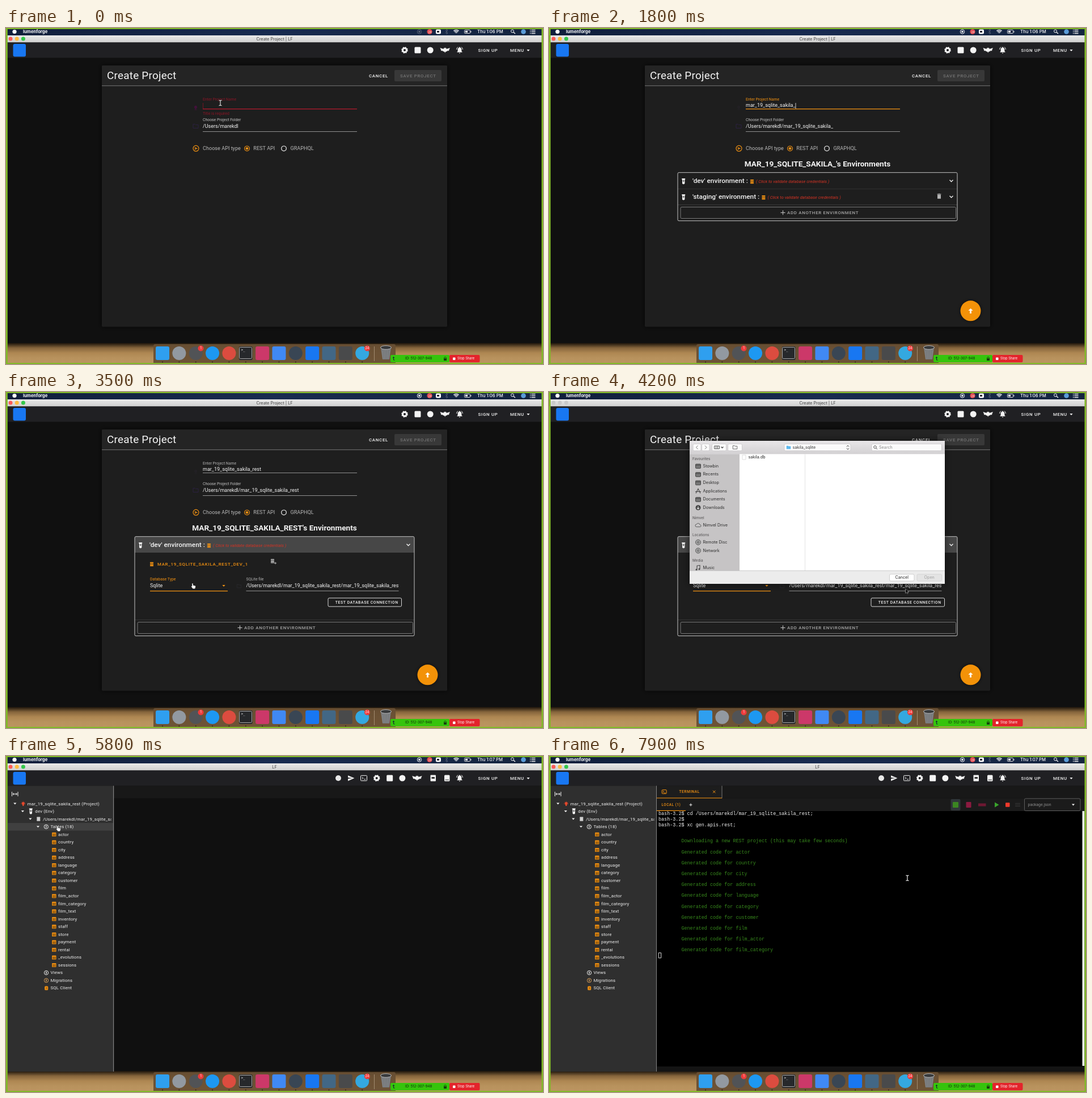
Recreate the animation shown at these times as an HTML page with a canvas. Size 947 by 592 pixels, loop 8 s.

```html
<!DOCTYPE html>
<html lang="en">
<head>
<meta charset="utf-8">
<title>Create Project</title>
<style>
html, body { margin: 0; width: 100%; height: 100%; overflow: hidden; background: #101010; }
canvas { display: block; }
</style>
</head>
<body>
<canvas id="stage" width="947" height="592"></canvas>
<script>
const c = document.getElementById('stage').getContext('2d');
const LOOP = 8000, ORANGE = '#f39212', WHITE = '#f4f4f4', GREY = '#b4b4b4';
const NAME = 'mar_19_sqlite_sakila_rest', HOME = '/Users/marekdl';
const TABLES = ('actor country city address language category customer film film_actor film_category ' +
  'film_text inventory staff store payment rental _evolutions sessions').split(' ');

// ---- drawing helpers ----
function box(x, y, w, h, fill, r = 0, stroke) {
  c.beginPath();
  c.roundRect(x, y, w, h, r);
  if (fill) { c.fillStyle = fill; c.fill(); }
  if (stroke) { c.strokeStyle = stroke; c.lineWidth = 1; c.stroke(); }
}
function dot(x, y, r, fill, stroke, lw = 1) {
  c.beginPath();
  c.arc(x, y, r, 0, 7);
  if (fill) { c.fillStyle = fill; c.fill(); }
  if (stroke) { c.strokeStyle = stroke; c.lineWidth = lw; c.stroke(); }
}
function line(color, lw, ...p) {
  c.beginPath();
  for (let i = 0; i < p.length; i += 2) c.lineTo(p[i], p[i + 1]);
  c.strokeStyle = color; c.lineWidth = lw; c.stroke();
}
function text(s, x, y, size, color = WHITE, o = {}) {
  c.font = `${o.i ? 'italic ' : ''}${o.w || 400} ${size}px ${o.f || 'Roboto'}, sans-serif`;
  c.letterSpacing = (o.ls || 0) * size + 'px';
  c.textAlign = o.a || 'left';
  c.textBaseline = 'middle';
  c.fillStyle = color;
  c.fillText(s, x, y);
  return c.measureText(s).width;
}
const caps = (s, x, y, color, size = 7.89, w = 500) => text(s, x, y, size, color, { w, ls: .0893 });
const ui = (s, x, y, size, color, o) => text(s, x, y, size, color, { f: 'Inter', ...o });
// Path on a 24-unit grid, centred on x, y
function icon(d, x, y, size, fill, stroke) {
  c.save();
  c.translate(x - size / 2, y - size / 2);
  c.scale(size / 24, size / 24);
  const p = new Path2D(d);
  if (stroke) { c.strokeStyle = stroke; c.lineWidth = 2; c.stroke(p); }
  if (fill) { c.fillStyle = fill; c.fill(p); }
  c.restore();
}
function gradient(x0, y0, x1, y1, ...colors) {
  const g = c.createLinearGradient(x0, y0, x1, y1);
  colors.forEach((k, i) => g.addColorStop(i / (colors.length - 1), k));
  return g;
}
function clip(x, y, w, h, draw) {
  c.save();
  c.beginPath(); c.rect(x, y, w, h); c.clip();
  draw();
  c.restore();
}

const SEND = 'M2 21l21-9L2 3v7l15 2-15 2z';
const BELL = 'M12 23a2 2 0 0 0 2-2h-4a2 2 0 0 0 2 2zm6-7v-5c0-3-1.6-5.6-4.5-6.3V4a1.5 1.5 0 0 0-3 0v.7C7.6 5.4 6 8 6 11v5l-2 2v1h16v-1z';
const BAT = 'M1 7L8 9Q10 9 10.5 6L12 8L13.5 6Q14 9 16 9L23 7Q21 11 20.5 14Q18 12 16 15Q13 14 12 18Q11 14 8 15Q6 12 3.5 14Q3 11 1 7z';
const BIN = 'M6 7h12v14H6zM5 4h4l1-1h4l1 1h4v2H5z';
const FOLDER = 'M3 5h7l2 2h9v12H3z';
const ARROW = 'M7 2v18l4-4 3 6 3-1.5-3-6h6z';
const HAND = 'M8 2q2-2 3 0l1 7 8 2q2 1 1 5l-2 6h-8l-6-8q0-3 3-1z';
const down = (x, y, color, r = 3) => line(color, 1.3, x - r, y - r / 2, x, y + r / 2, x + r, y - r / 2);
const tri = (x, y, color = WHITE) => icon('M3 7h18l-9 10z', x, y, 7, color);
function gear(x, y, r, color) {
  dot(x, y, r * .6, null, color, r * .5);
  c.setLineDash([r * .36, r * .3]);
  dot(x, y, r * .84, null, color, r * .32);
  c.setLineDash([]);
}
function db(x, y, color) {
  for (let i = -1; i < 2; i++) box(x - 3.2, y + i * 2.6 - 1.1, 6.4, 2, color, 1);
}
function prompt(x, y, color, w = 11) {
  box(x - w / 2, y - w * .42, w, w * .84, null, 1, color);
  line(color, 1, x - w * .3, y - 2, x - w * .1, y, x - w * .3, y + 2);
  line(color, 1, x, y + 2, x + w * .3, y + 2);
}
function flask(x, y) {
  box(x - 2.2, y - 5, 4.4, 10, WHITE, [0, 0, 2, 2]);
  box(x - 3, y - 5, 6, 1.6, WHITE);
  box(x - 1, y - 2, 2, 2.5, '#444');
}

// ---- desktop, menu bar and dock ----
function desktop(t) {
  box(0, 0, 947, 592, '#101010');
  box(0, 555, 947, 37, gradient(0, 555, 0, 590, '#1c140b', '#86653c', '#ae8752', '#b8925d', '#bb9560'));
  box(0, 0, 947, 13, gradient(0, 0, 947, 0, '#101e3b', '#182b50', '#14243f'));
  dot(15, 6.5, 3.6, '#fff');
  ui('lumenforge', 30, 6.5, 7.7, '#fff', { w: 700 });
  const rec = t < 100 ? '#5a6478' : '#fff';
  dot(729, 6.5, 3.7, null, rec); dot(729, 6.5, 1.8, rec);
  dot(747, 6.5, 4.6, '#e04a50');
  ui('24', 747.5, 8, 4.5, '#fff', { a: 'center' });
  box(758, 2.5, 9, 8, '#fff', 2); box(760, 5, 4, 3, '#223');
  line('#4a566e', 1, 775, 4, 779, 9, 777, 11, 777, 2, 779, 4, 775, 9);
  for (let r = 2; r < 8; r += 2.3) {
    c.beginPath(); c.arc(794, 10, r, -2.35, -.8);
    c.strokeStyle = '#fff'; c.lineWidth = 1.3; c.stroke();
  }
  box(808.5, 3.5, 10, 6, null, 1, '#ddd'); box(810, 5, 4, 3, '#fff'); box(819.5, 5, 1, 3, '#ddd');
  ui(t < 5000 ? 'Thu 1:06 PM' : 'Thu 1:07 PM', 831, 6.5, 7.7, '#fff', { w: 500 });
  dot(893, 5.5, 2.5, null, '#fff'); line('#fff', 1.2, 895, 7.5, 898, 10);
  dot(912.5, 6.5, 4.3, '#5a9bd8');
  for (let i = 0; i < 3; i++) { box(924, 3 + i * 3, 1.3, 1.3, '#fff'); box(926.5, 3 + i * 3, 7, 1.3, '#fff'); }
}
function dock() {
  box(260, 557, 427, 36, 'rgba(105,79,51,.94)', 3);
  const apps = [['#2f9fef', 1], ['#9299a1', 0], ['#515356', 0], ['#1d98f2', 0], ['#dc4c3f', 0], ['#26282b', 1],
    ['#cc3869', 1], ['#4089f4', 1], ['#394654', 0], ['#1877f2', 1], ['#426785', 1], ['#494a4b', 1], ['#34a8e0', 0]];
  apps.forEach(([color, square], i) => {
    const x = 276 + i * 29.35;
    if (square) box(x - 12, 561, 24, 24, color, 3);
    else dot(x, 573, 12, color);
    dot(x, 588.5, .9, '#2b1f14');
  });
  box(411.5, 562.5, 22, 20, '#26282b', 2, '#a8a8a8');
  text('>_', 414.5, 567.5, 6, '#fff', { f: 'DejaVu Sans Mono' });
  for (const [x, s] of [[343.5, '1'], [637, '24']]) {
    dot(x, 564.5, 5, '#ee3b3b');
    ui(s, x, 564.7, 5.5, '#fff', { a: 'center' });
  }
  box(649, 561, 1, 26, '#a18b70');
  icon('M3 3h18l-3 20H6z', 670, 573, 24, '#74777a');
  c.beginPath(); c.ellipse(670, 563, 9.5, 3.3, 0, 0, 7);
  c.fillStyle = '#383a3c'; c.fill(); c.strokeStyle = '#bbb'; c.lineWidth = 1; c.stroke();
  for (let i = -2; i < 3; i++) line('#999', .6, 670 + i * 3.5, 567, 670 + i * 2.6, 583);
}
function shareBar() {
  box(678, 576, 104, 13, '#35c40c', 2);
  box(782, 576, 53.5, 13, '#e3242b', 2);
  line('#123', 1, 685.5, 585, 683.5, 585, 683.5, 579.5); line('#123', 1, 682, 581.5, 683.5, 579.5, 685, 581.5);
  ui('ID: 512-307-948', 704, 582.5, 6.1, '#10270c');
  box(772, 582, 5, 4, '#17420d'); dot(774.5, 581.5, 1.8, null, '#17420d');
  box(788, 580.5, 4.5, 4.5, '#fff', 1);
  ui('Stop Share', 796, 582.5, 5.8, '#fff');
}
function frameBorder() {
  c.fillStyle = '#80b927';
  c.fillRect(0, 0, 947, 2); c.fillRect(0, 590, 947, 2);
  c.fillRect(0, 0, 2.8, 592); c.fillRect(944.5, 0, 3, 592);
}

// ---- application window ----
function header(title, project, inactive) {
  box(0, 13, 947, 12.5, gradient(0, 13, 0, 25, '#e9e9e9', '#d0d0d0'));
  ['#fc5b57', '#fdbc40', '#34c84a'].forEach((k, i) => dot(8 + i * 11.2, 19, 3.5, inactive ? '#cacaca' : k));
  ui(title, 473.5, 19.5, 7.3, '#444', { a: 'center' });
  box(0, 25.5, 947, 27, '#202023');
  box(12.5, 28, 22.5, 22.5, '#1877f2', 3);
  const y = 39;
  if (project) {
    dot(586, y, 5, '#e8e8e8');
    icon(SEND, 608.5, y, 13, WHITE);
    prompt(631, y, WHITE);
    box(748.5, y - 5.5, 9.5, 11, WHITE, 1); box(750.5, y - 2, 5.5, 3, '#333');
    box(773, y - 5.5, 9.5, 11, WHITE, 1.5); line('#333', 1, 774.5, y + 3, 781, y + 3);
  }
  const d = project ? -49.3 : 0;
  gear(703 + d, y, 5.8, WHITE);
  box(720.5 + d, y - 5.5, 11, 11, WHITE, 1.5);
  dot(748.2 + d, y, 5.5, WHITE);
  icon(BAT, 774.2 + d, y, 19, WHITE);
  icon(BELL, 800, y - .3, 13.5, WHITE);
  line(WHITE, 1, 794.5, 38, 795.5, 35, 797, 33.5); line(WHITE, 1, 805.5, 38, 804.5, 35, 803, 33.5);
  caps('SIGN UP', 832.5, y + .3, WHITE);
  caps('MENU', 889, y + .3, WHITE);
  tri(921, y + .5);
}

function createPage(t) {
  const typed = NAME.slice(0, Math.max(0, Math.min(25, Math.floor((t - 200) / 76))));
  const staging = t >= 2300 && t < 2900, scroll = staging ? 27.5 : 0;
  const dev = t >= 3100, sqlite = t >= 3500;
  // The scrollbar narrows the content
  const X = x => staging ? 169 + (x - 169) * 603.5 / 609 : x;

  header('Create Project | LF', false, t >= 3700 && t < 4800);
  c.shadowColor = 'rgba(0,0,0,.7)'; c.shadowBlur = 8;
  box(169, 66, 609, 460.5, '#1e1e1e', 2);
  c.shadowBlur = 0;
  box(169, 66, 609, 35.5, '#242424', 2);
  box(169, 101.3, 609, 1, '#777');
  text('Create Project', 178, 84.5, 18.9, WHITE, { ls: .0125 });
  caps('CANCEL', 640, 84.3, WHITE);
  box(685, 74, 83, 20, '#383838', 2);
  caps('SAVE PROJECT', 695, 84.3, t >= 5100 ? WHITE : '#737373');

  clip(169, 106.5, 609, 420, () => {
    c.translate(0, -scroll);
    const empty = !typed, focus = t < 2300;
    const accent = empty ? '#8b1526' : focus ? ORANGE : GREY;
    icon('M8 22h8v-3H8zM12 5a6 6 0 0 0-3 11v2h6v-2a6 6 0 0 0-3-11M12 0v3M3 3l2 3M21 3l-2 3', X(334.5), 140, 11, empty ? '#42123a' : '#222024');
    text('Enter Project Name', X(347), 125.5, 6.85, accent);
    const w = text(typed, X(347), 136.8, 9.02, WHITE);
    if (focus) box(X(347) + w, 132, .8, 10, empty ? '#8b1526' : WHITE);
    box(X(347), 142, X(619) - X(347), focus ? 1.3 : .8, empty ? '#b5192c' : focus ? ORANGE : GREY);
    if (empty) text('Title is required', X(347), 150.8, 6.85, '#8b1526');
    icon(FOLDER, X(334.5), 173, 12, null, '#2b2140');
    text('Choose Project Folder', X(347), 161.5, 6.85, '#c4c4c4');
    text(HOME + (empty ? '' : '/' + typed), X(347), 173, 9.02, WHITE);
    box(X(347), 182, X(619) - X(347), .8, GREY);

    dot(X(335), 212.2, 5, null, ORANGE, 1.2);
    icon(SEND, X(335.3), 212.2, 6, ORANGE);
    text('Choose API type', X(347), 212.5, 9.15, '#b9b9b9');
    dot(X(425), 212.3, 4.3, null, ORANGE, 1.2); dot(X(425), 212.3, 2.2, ORANGE);
    text('REST API', X(436.3), 212.5, 9.1, '#b9b9b9');
    dot(X(490), 212.3, 4.3, null, WHITE, 1.2);
    text('GRAPHQL', X(501.5), 212.5, 9.1, '#b9b9b9');
    if (empty) return;

    text(typed.toUpperCase() + "'s Environments", X(473.5), 239.7, 13.6, WHITE, { w: 700, a: 'center' });
    let y = 255;
    y = panel('dev', y, dev, sqlite, X);
    if (t < 3000) y = panel('staging', y, staging, false, X);
    box(X(227), y, X(720) - X(227), .7, '#3c3c3c');
    box(X(232), y + 4.5, X(717.5) - X(232), 20, null, 2, '#777');
    const px = X(412.5), py = y + 14.3;
    line(GREY, 1.2, px - 4, py, px + 4, py); line(GREY, 1.2, px, py - 4, px, py + 4);
    caps('ADD ANOTHER ENVIRONMENT', X(420), py + .3, '#a6a6a6');
    box(X(227), 254.7, X(720) - X(227), y + 29 - 255, null, 2, '#c4c4c4');
  });

  if (staging) { box(772, 109, 5.5, 417, '#f2f2f2'); box(772.5, 136, 4.5, 389, '#a9a9a9', 2); }
  if (typed) {
    c.shadowColor = 'rgba(0,0,0,.6)'; c.shadowBlur = 6;
    dot(743.5, 498.3, 18, '#f39208');
    c.shadowBlur = 0;
    icon('M12 2l9 9h-6v11H9V11H3z', 743.5, 498.5, 11, '#fff');
  }
  if (t >= 3700 && t < 4800) fileDialog(t >= 4500);
  return t;
}

// One environment row; returns the y below it
function panel(env, y, open, sqlite, X) {
  const right = X(720), mid = y + 14.3;
  if (open) box(X(227), y, right - X(227), 28, '#474747');
  flask(X(237.2), mid + 1);
  let x = X(253);
  x += text(`'${env}' environment :`, x, mid, 11.83, WHITE, { w: 500 }) + 7.2;
  db(x, mid + 1.5, ORANGE);
  text('( Click to validate database credentials )', x + 7, mid + 1.5, 7.5, '#d33324', { i: 1 });
  if (env === 'staging') icon(BIN, X(688), mid - 1, 12, GREY);
  down(X(709.5), mid, WHITE);
  y += 28;
  if (!open) { box(X(227), y, right - X(227), .7, '#343434'); return y; }

  function field(label, value, x0, x1, dy, active, select) {
    const a = X(x0), b = X(x1), mark = active ? ORANGE : GREY;
    text(label, a, y + dy, 6.9, mark);
    clip(a, y + dy, b - a, 20, () => {
      const w = text(value, a, y + dy + 11.5, sqlite ? 8.9 : 7.89, WHITE);
      if (active && !select) box(a + w + .3, y + dy + 7, .8, 9, WHITE);
    });
    if (select) tri(b - 7, y + dy + 11.5, active ? ORANGE : WHITE);
    box(a, y + dy + 20, b - a, active ? 1.3 : .8, mark);
  }
  const base = `${NAME}_${env}_1`;
  db(X(257), y + 20.5, ORANGE);
  caps(base.toUpperCase(), X(267), y + 20.6, ORANGE, 7.89);
  db(X(470), y + 15, GREY);
  line(GREY, 1, X(473), y + 18.5, X(477), y + 18.5); line(GREY, 1, X(475), y + 16.5, X(475), y + 20.5);
  let button = 80;
  if (sqlite) {
    field('Database Type', 'Sqlite', 254, 391, 47, true, true);
    icon(FOLDER, 411, y + 59, 10, null, '#2b2b30');
    field('SQLite file', button && HOME + `/${NAME}/${base}`, 423.5, 692.5, 47);
  } else {
    button = 163;
    field('Database Type', 'MySQL', 254.3, 391, 47, false, true);
    field('Host address', 'localhost', 404.5, 541.5, 47);
    field('Port number', '3306', 555.3, 692, 47);
    field('Username', 'root', 254.3, 391, 86.5);
    field('Password', 'password', 404.5, 541.5, 86.5, env === 'staging');
    field('Database : create if not exists', base, 555.3, 692, 86.5);
    box(X(254.3), y + 126.5, X(692) - X(254.3), 29, null, 2, '#b69a80');
    text('SSL / Advanced parameters', X(258.3), y + 141, 8.75, '#a0a0a0');
    down(X(681), y + 141, WHITE);
  }
  const bx = X(698) - 130;
  box(bx, y + button, 129.5, 15, null, 2, '#d8d8d8');
  caps('TEST DATABASE CONNECTION', bx + 12.7, y + button + 7.5, WHITE, 6.85);
  return y + (sqlite ? 118 : 200);
}

function fileDialog(picked) {
  c.shadowColor = 'rgba(0,0,0,.6)'; c.shadowBlur = 12;
  box(248, 86, 450, 252, '#ececec');
  c.shadowBlur = 0;
  box(248, 86, 450, 23.5, gradient(0, 86, 0, 109, '#e8e6e8', '#d3d1d3'));
  box(336, 109.5, 362, 205.5, '#fff');
  box(248, 109.5, 88, 205.5, '#c6c4c5');
  box(451, 109.5, .8, 205.5, '#ddd');
  box(248, 314.5, 450, .8, '#bbb');
  for (const [x, w] of [[254, 14], [269.5, 13.5], [287.5, 25], [315.5, 25], [415, 117], [569, 123.5]])
    box(x, 91.5, w, 12, '#fbfbfb', 2, '#cfcdcf');
  line('#777', 1, 262.5, 94.5, 259.5, 97.5, 262.5, 100.5);
  line('#777', 1, 275, 94.5, 278, 97.5, 275, 100.5);
  for (let i = 0; i < 3; i++) box(291.5 + i * 3, 95, 3, 5, null, 0, '#555');
  down(305.5, 97.5, '#555', 2);
  icon(FOLDER, 328, 97.5, 10, null, '#555');
  icon(FOLDER, 422.5, 97.7, 10, '#5cb8ee');
  ui('sakila_sqlite', 429.5, 97.8, 7.2, '#333');
  line('#555', 1, 525, 96.5, 527, 94, 529, 96.5); line('#555', 1, 525, 99, 527, 101.5, 529, 99);
  dot(575, 97, 2.3, null, '#555'); line('#555', 1, 577, 99, 579, 101);
  ui('Search', 582, 97.8, 7.2, '#8a8a8a');

  const side = [['Favourites', 118], ['Stowbin', 130.5, 1], ['Recents', 145.2, 1], ['Desktop', 159.8, 1], ['Applications', 174.5, 2],
    ['Documents', 189.2, 1], ['Downloads', 203.8, 3], ['Nimvel', 221.8], ['Nimvel Drive', 234.4, 4], ['Locations', 252.3],
    ['Remote Disc', 264.8, 5], ['Network', 279.5, 5], ['Media', 297.2], ['Music', 309.8, 6]];
  clip(248, 109, 88, 205.5, () => side.forEach(([s, y, kind]) => {
    if (!kind) return ui(s, 253, y, 6.3, '#5e5c5d', { w: 500 });
    ui(s, 271.5, y, 7.25, '#2c2c2c');
    const x = 263;
    if (kind === 1) { box(x - 4.5, y - 3.5, 9, 7.5, '#777', 1, '#444'); line('#444', 1, x - 4, y - 1.5, x + 4, y - 1.5); }
    if (kind === 2) { line('#444', 1.1, x - 4, y + 4, x, y - 4, x + 4, y + 4); line('#444', 1.1, x - 5, y + 1, x + 5, y + 1); }
    if (kind === 3) { dot(x, y, 4.5, '#444'); line('#ddd', 1.1, x, y - 2.5, x, y + 2); down(x, y + 1.5, '#ddd', 2); }
    if (kind === 4) icon('M6 19a5 5 0 0 1 0-10a7 7 0 0 1 13 2a4 4 0 0 1 0 8z', x, y, 11, null, '#555');
    if (kind === 5) { dot(x, y, 4.5, '#aaa', '#555'); dot(x, y, 1.6, null, '#555'); }
    if (kind === 6) { line('#444', 1.1, x - 2, y + 3, x - 2, y - 3.5, x + 3, y - 4.5, x + 3, y + 2); dot(x - 3, y + 3.2, 1.5, '#444'); dot(x + 2, y + 2.2, 1.5, '#444'); }
  }));
  if (picked) box(336, 110, 115, 10.5, '#1166d8');
  box(341, 111, 6, 8, '#fff', 0, '#ddd');
  ui('sakila.db', 351.5, 115.2, 7.2, picked ? '#fff' : '#222');
  box(600.5, 321, 43.5, 12, '#fff', 2, '#cfcfcf');
  ui('Cancel', 622.2, 327.3, 7.2, '#222', { a: 'center' });
  box(649, 321, 43.5, 12, picked ? '#2b7df0' : '#e4e4e4', 2, picked ? '#2b7df0' : '#d6d6d6');
  ui('Open', 670.7, 327.3, 7.2, picked ? '#fff' : '#a2a2a2', { a: 'center' });
}

function projectPage(t) {
  const open = t >= 5700;
  header('LF', true);
  box(190, 52.5, 755, 22, '#181818');
  box(2, 52.5, 187.5, 503.5, '#2f2f2f');
  box(189, 52.5, 1.2, 503.5, '#858585');
  line(WHITE, 1, 10.5, 63, 10.5, 71); line(WHITE, 1, 21, 63, 21, 71); line(WHITE, 1, 12, 67, 19.5, 67);
  line(WHITE, 1, 14, 65, 12, 67, 14, 69); line(WHITE, 1, 17.5, 65, 19.5, 67, 17.5, 69);

  const step = 13.54;
  let y = 84;
  if (t >= 5600 && t < 6100) box(2.8, 118, 186.2, 13.5, '#404040');
  const label = (s, x) => clip(0, y - 8, 185.5, 16, () => text(s, x, y + .2, 7.89, '#efefef', { ls: .0178 }));
  const branch = [NAME + ' (Project)', 'dev (Env)', `${HOME}/${NAME}`, 'Tables (18)'];
  branch.forEach((s, i) => {
    if (i < 3 || open) tri(15.8 + i * 13.55, y);
    else icon('M7 3v18l10-9z', 56.5, y, 7, WHITE);
    const x = 30.3 + i * 13.5;
    if (i === 0) {
      dot(x, y - .5, 2.6, '#e2482c'); box(x - 1.2, y + 2, 2.4, 2, '#e2482c');
      for (let k = 0; k < 5; k++) {
        const a = -k * Math.PI / 4, u = Math.cos(a), v = Math.sin(a);
        line('#c23d27', .8, x + 3.3 * u, y + 3.3 * v, x + 4.5 * u, y + 4.5 * v);
      }
    }
    if (i === 1) flask(x, y);
    if (i === 2) db(x, y, WHITE);
    if (i === 3) { dot(x, y, 3.6, null, WHITE); box(x - .6, y - 2, 1.2, 4, WHITE); }
    label(s, 37.8 + i * 13.55);
    y += step;
  });
  if (open) for (const s of TABLES) {
    box(81, y - 3.3, 7.5, 7, ORANGE, 1);
    for (const k of [-.8, 1.5]) box(81.5, y + k, 6.5, .6, '#4a2f0c');
    for (const k of [83.2, 85.7]) box(k, y - 1, .6, 4.4, '#4a2f0c');
    label(s, 92);
    y += step;
  }
  ['Views', 'Migrations', 'SQL Client'].forEach((s, i) => {
    const color = i ? '#d9a05c' : WHITE;
    if (i < 2) { dot(71, y, 3.6, null, color); box(70.3, y - 1.8, 1.4, 3.6, color); }
    else { box(68.2, y - 3.5, 6, 7, ORANGE, 1.5); line('#6b4208', .8, 70, y - 1, 73, y - 1); line('#6b4208', .8, 70, y + 1, 73, y + 1); }
    label(s, 78.5);
    y += step;
  });
  if (t >= 6400) terminal(t);
}

function terminal(t) {
  box(190, 52.5, 115, 22, '#1d1d1d');
  box(304.5, 52.5, 1, 22, '#777');
  box(190, 73.5, 115, 1.2, ORANGE);
  prompt(203.2, 63, ORANGE, 8);
  caps('TERMINAL', 229.5, 63.3, ORANGE, 6.5);
  line(ORANGE, 1, 289, 60.8, 293.5, 65.3); line(ORANGE, 1, 293.5, 60.8, 289, 65.3);
  box(190, 74.7, 755, 22.3, '#1b1b1b');
  caps('LOCAL (1)', 198.5, 85.8, ORANGE, 6.3);
  box(190, 95.8, 51, 1.2, ORANGE);
  line(WHITE, 1, 247.5, 86, 252.5, 86); line(WHITE, 1, 250, 83.5, 250, 88.5);
  if (t >= 6800) box(708.5, 76, 17, 20, '#30363a', 2);
  box(712, 81, 10, 10, '#3b8522', 1);
  box(735.5, 81, 9, 10, '#8c1a40', 1);
  box(757, 83.5, 13.5, 5, '#6e1832');
  icon('M5 3v18l15-9z', 789.5, 86, 12, '#39a32b');
  box(805, 82.2, 7.5, 7.5, '#ef392b', 1);
  for (let i = -1; i < 2; i++) line('#363636', 1, 822, 86 + i * 2.5, 831, 86 + i * 2.5);
  box(838.5, 75, 98.5, 21.5, '#1b1b1b', 2, '#5e5e5e');
  text('package.json', 844.5, 85.8, 6.95, '#8d8d8d');
  tri(924.5, 86);
  box(190, 97, 755, 450, '#000');
  box(940.5, 97, 4, 449, '#f4f4f4');
  box(190, 547, 755, 9, '#141414');

  const put = (s, row, color) => text(s, 193, 102.2 + row * 9.6, 8.43, color, { f: 'Liberation Mono' });
  let row = 0;
  if (t >= 6900) {
    put(`bash-3.2$ cd ${HOME}/${NAME};`, 0, WHITE);
    put('bash-3.2$', 1, WHITE);
    put('bash-3.2$ xc gen.apis.rest;', 2, WHITE);
    row = 3;
  }
  const tab = ' '.repeat(8), green = '#37891c';
  if (t >= 7100) { put(tab + 'Downloading a new REST project (this may take few seconds)', 5, green); row = 6; }
  const done = Math.max(0, Math.min(10, Math.floor((t - 7240) / 60)));
  for (let i = 0; i < done; i++) put(tab + 'Generated code for ' + TABLES[i], 7 + 2 * i, green);
  if (done) row = 6 + 2 * done;
  const y = 97 + row * 9.6;
  if (t < 6800) box(192.5, y, 5.2, 9.3, '#fff');
  else box(193.2, y + .2, 4.5, 9, null, 0, '#ddd');
}

// ---- pointer: time, x, y, shape (I-beam, arrow, hand or hidden) ----
const PATH = [[0, 378, 132, 'I'], [300, 378, 132, ''], [2100, 500, 220, 'a'], [2300, 680, 297, 'h'], [2600, 705, 271, 'h'],
  [2800, 705, 271, 'h'], [2900, 683, 298, 'h'], [3100, 705, 270, 'h'], [3300, 330, 342, 'h'], [3500, 330, 342, 'h'],
  [3700, 560, 342, 'a'], [4100, 631, 350, 'a'], [4300, 631, 350, 'a'], [4500, 366, 115, 'a'], [4700, 670, 327, 'a'],
  [4900, 633, 371, 'h'], [5200, 726, 84, 'h'], [5400, 500, 200, 'a'], [5600, 92, 128, 'h'], [5900, 92, 128, 'h'],
  [6200, 631, 41, 'h'], [6400, 631, 41, 'h'], [6600, 711, 106, 'I'], [6700, 717, 87, 'h'], [6900, 717, 87, 'I'],
  [7200, 632, 215, 'I'], [8000, 632, 215, 'I']];
function pointer(t) {
  const i = PATH.findIndex(p => p[0] > t) - 1, a = PATH[i], b = PATH[i + 1];
  const k = (t - a[0]) / (b[0] - a[0]);
  const x = a[1] + (b[1] - a[1]) * k, y = a[2] + (b[2] - a[2]) * k;
  if (a[3] === 'I') {
    for (const [color, w] of [['#222', 2.4], ['#e8e8e8', 1.1]]) {
      line(color, w, x, y - 4.5, x, y + 4.5);
      line(color, w, x - 2.5, y - 4.8, x, y - 4, x + 2.5, y - 4.8);
      line(color, w, x - 2.5, y + 4.8, x, y + 4, x + 2.5, y + 4.8);
    }
  }
  if (a[3] === 'a') icon(ARROW, x, y + 1, 10, '#111', '#fff');
  if (a[3] === 'h') icon(HAND, x, y, 11, '#f4f4f4', '#222');
}

function frame(now) {
  const t = Math.floor(now % LOOP / 100) * 100;
  desktop(t);
  if (t < 5500) createPage(t); else projectPage(t);
  dock();
  shareBar();
  pointer(t);
  frameBorder();
  requestAnimationFrame(frame);
}
requestAnimationFrame(frame);
</script>
</body>
</html>
```
